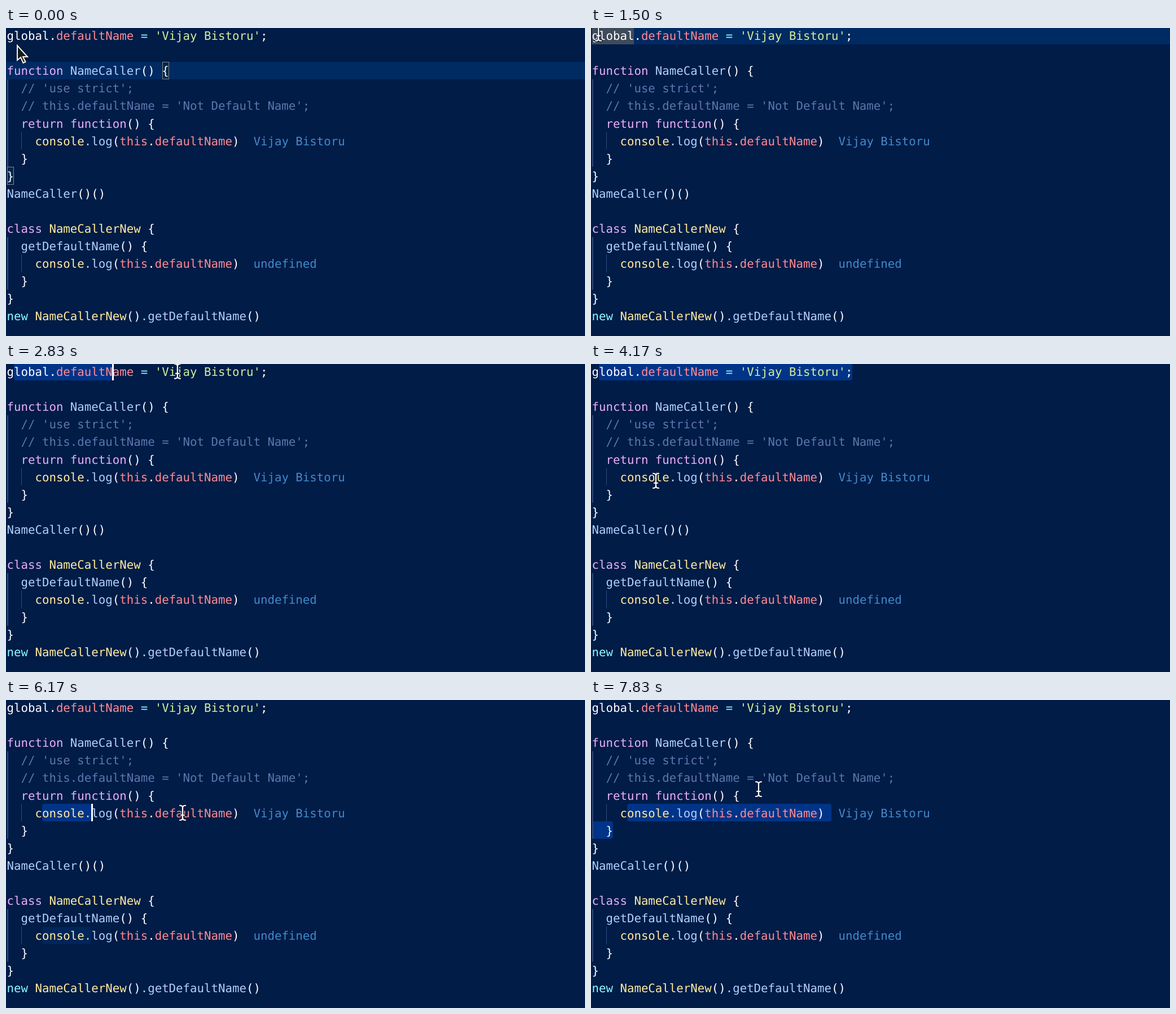
Write an HTML page that moves like this. It is 1026 by 546 pixels and loops after 8000 ms.

```html
<!DOCTYPE html>
<html lang="en">
<head>
<meta charset="utf-8">
<title>Code walkthrough</title>
<style>
  html, body { margin: 0; width: 100%; height: 100%; overflow: hidden; background: #001c47; }
  #stage { position: relative; width: 1026px; height: 546px; overflow: hidden; background: #001c47; }
  #stage > * { position: absolute; }
  pre {
    left: 1.5px; top: -0.8px; margin: 0; color: #fff;
    font: 20.74px/31.06px "DejaVu Sans Mono", monospace;
    text-rendering: geometricPrecision; font-variant-ligatures: none;
  }
  pre i { font-style: normal; }
  .k { color: #e6b1fc } .f { color: #b0d0ff } .y { color: #ffec9e } .r { color: #ff8b93 }
  .s { color: #d0f09a } .a { color: #8cfcff } .c { color: #5f75ad } .q { color: #4489cc }
  .line { background: #002a62; }
  .word { background: #3f4a5a; }
  .sel { background: #003488; border-radius: 4px; }
  .echo { background: #002558; border-radius: 4px; }
  .guide { width: 1.5px; background: #34497a; }
  .bracket { box-sizing: border-box; border: 1.6px solid #83888c; background: #04264a; }
  .caret { width: 3px; background: #fff; }
  svg { left: 0; top: 0; overflow: visible; }
</style>
</head>
<body>
<div id="stage">
<pre>global.<i class="r">defaultName</i> <i class="a">=</i> <i class="s">'Vijay Bistoru'</i>;

<i class="k">function</i> <i class="f">NameCaller</i>() {
  <i class="c">// 'use strict';</i>
  <i class="c">// this.defaultName = 'Not Default Name';</i>
  <i class="k">return function</i>() {
    <i class="y">console</i><i class="f">.log</i>(<i class="r">this</i>.<i class="r">defaultName</i>)  <i class="q">Vijay Bistoru</i>
  }
}
<i class="f">NameCaller</i>()()

<i class="k">class</i> <i class="y">NameCallerNew</i> {
  <i class="f">getDefaultName</i>() {
    <i class="y">console</i><i class="f">.log</i>(<i class="r">this</i>.<i class="r">defaultName</i>)  <i class="q">undefined</i>
  }
}
<i class="a">new</i> <i class="y">NameCallerNew</i>()<i class="f">.getDefaultName</i>()</pre>
<svg width="1026" height="546">
  <defs>
    <path id="bar" d="M-5-13Q0-13 0-9Q0-13 5-13M0-9V9M-5 13Q0 13 0 9Q0 13 5 13M-3 4H3"/>
  </defs>
  <path id="arrow" d="M0 0V26L6 21L10.5 31L14.5 29L10 20H18Z" fill="#141c22" stroke="#fff4e0" stroke-width="2"/>
  <g id="beam" fill="none" stroke-linecap="round">
    <use href="#bar" stroke="#0a1838" stroke-width="4.5"/>
    <use href="#bar" stroke="#fff" stroke-width="2.2"/>
  </g>
</svg>
</div>
<script>
const DURATION = 8000, FPS = 6, CW = 12.486, LH = 31.06, X0 = 1.5, Y0 = -2;
const stage = document.getElementById('stage'), text = stage.querySelector('pre');
const arrow = document.getElementById('arrow'), beam = document.getElementById('beam');
const colX = c => X0 + c * CW, rowY = r => Y0 + r * LH;

// A box over whole rows, in pixels across and text rows down.
function box(kind, x = 0, row = 0, w = 0, rows = 1) {
  const el = document.createElement('div');
  el.className = kind;
  stage.insertBefore(el, text);
  place(el, x, row, w, rows);
  return el;
}
function place(el, x, row, w, rows = 1) {
  el.style.left = x + 'px';
  el.style.top = rowY(row) + 'px';
  el.style.height = LH * rows + 'px';
  if (w) el.style.width = w + 'px';
}
function show(el, on) { el.style.visibility = on ? 'visible' : 'hidden'; }
function span(el, row, from, to) {
  show(el, to > from);
  if (to > from) place(el, colX(from), row, (to - from) * CW);
}

const line = box('line', 0, 0, 1026);
const word = box('word', colX(0), 0, 6 * CW);
const sel = box('sel'), tail = box('sel'), echo = box('echo');
box('guide', 2, 3, 0, 5);
box('guide', 26.5, 6);
box('guide', 2, 12, 0, 3);
box('guide', 26.5, 13);
const brackets = [box('bracket', colX(22) + 1, 2, 12), box('bracket', 1.5, 8, 12)];
const caret = box('caret');
stage.insertBefore(caret, stage.querySelector('svg'));

// Places where the pointer pauses or turns; it eases between them.
const stops = [
  { at: 0, x: 20, y: 31 }, { at: 4, x: 8, y: 12 }, { at: 13, x: 17, y: 8 },
  { at: 20, x: 490, y: 16 }, { at: 25, x: 115, y: 207 }, { at: 33, x: 59, y: 200 },
  { at: 35, x: 64, y: 200 }, { at: 37, x: 313, y: 200 }, { at: 42, x: 757, y: 228 },
  { at: 47, x: 297, y: 158 }
];
function pointer(n) {
  const i = Math.max(1, stops.findIndex(s => s.at >= n));
  const a = stops[i - 1], b = stops[i];
  const u = (n - a.at) / (b.at - a.at), e = u * u * (3 - 2 * u);
  return [a.x + (b.x - a.x) * e, a.y + (b.y - a.y) * e];
}

// Ticks of each mouse action; a dragged selection trails the pointer.
const CLICK = 4, SETTLE = 6, PLACE = 11, DRAG1 = 14, DROP1 = 21;
const PRESS = 35, DRAG2 = 36, WRAP = 41, DROP2 = 43, LAG = 1.2;
const dragCol = (n, from, end) =>
  Math.max(from, Math.min(end, Math.round((pointer(n - LAG)[0] - X0) / CW)));

function draw(n) {
  const second = n >= PRESS, multi = n >= WRAP;
  const row = second ? 6 : 0;
  const from = second ? 5 : n >= PLACE ? 1 : 0;
  let to = from, moved = n >= PLACE ? PLACE : CLICK;
  if (second) {
    moved = Math.min(n, DROP2);
    if (n >= DRAG2) to = multi ? 34 : dragCol(n, from, 33);
  } else if (n >= DRAG1) {
    moved = Math.min(n, DROP1);
    to = dragCol(moved, from, 37);
  }

  place(line, 0, n < CLICK ? 2 : row);
  show(line, from === to);
  show(word, n >= SETTLE && n < DRAG1);
  brackets.forEach(b => show(b, n < SETTLE));
  span(sel, row, from, to);
  span(tail, 7, 0, multi ? 3 : 0);
  span(echo, 13, from, second && !multi ? to : 0);

  show(caret, n >= CLICK && Math.floor((n - moved) / 3) % 2 === 0);
  place(caret, colX(multi ? 3 : to) - 0.8, multi ? 7 : row);

  const at = `translate(${pointer(n)})`;
  arrow.setAttribute('transform', at);
  beam.setAttribute('transform', at);
  show(arrow, n < 2);
  show(beam, n >= 2);
}

const start = performance.now();
function tick() {
  const t = (performance.now() - start) % DURATION;
  draw(Math.min(47, Math.floor(t * FPS / 1000 + 0.05)));
  requestAnimationFrame(tick);
}
tick();
</script>
</body>
</html>
```
